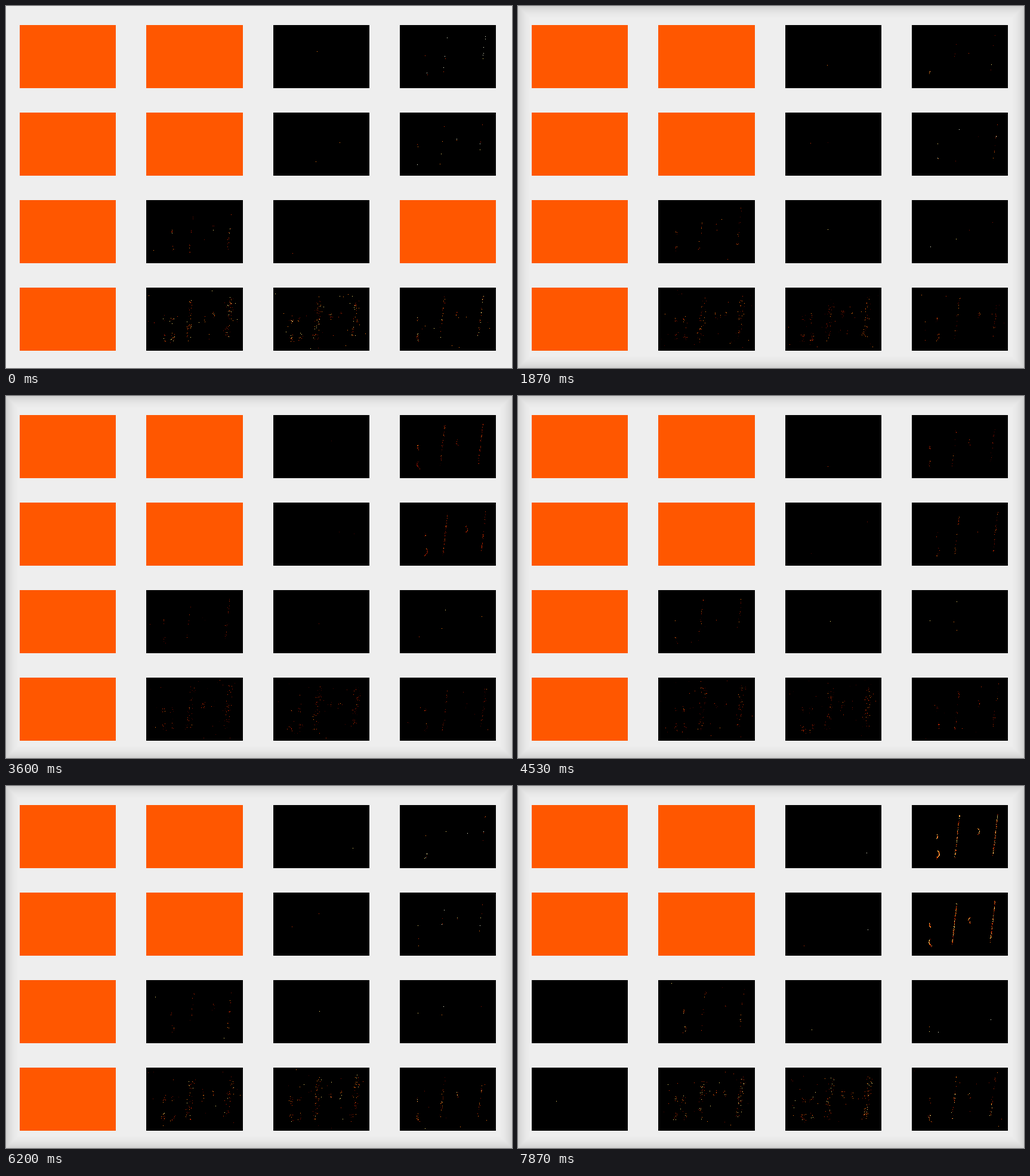
Recreate the animation shown at these times as an HTML page with a canvas. Size 848 px wide and 608 px high, loop 8 s.

```html
<!DOCTYPE html>
<html lang="en">
<head>
<meta charset="utf-8">
<title>Panel grid</title>
<style>
html, body { margin: 0; width: 100%; height: 100%; overflow: hidden; background: #eee; }
canvas { display: block; }
</style>
</head>
<body>
<canvas id="stage" width="848" height="608"></canvas>
<script>
const ctx = document.getElementById('stage').getContext('2d');
const W = 848, H = 608, LOOP = 8000, TICK = 200 / 3;
const PAPER = '#eee', ORANGE = '#ff5700';
const RAMP = ['#200000', '#480400', '#861000', '#d83000', '#ff7a10', '#ffe070', '#ffffe0'];

// When each new state begins to fade in, and for how many ticks.
const STARTS = [130, 930, 1730, 2600, 3470, 4270, 5070, 5930, 6930, 7730];
const TICKS = [2, 3, 2, 3, 2, 4, 3, 4, 2, 2];

// Outline strokes: start, control and end point, then the share of dots.
const OUTLINE = [
  { path: [[75, 16], [71, 52], [67, 87]], share: .33 },
  { path: [[139, 14], [135, 49], [131, 83]], share: .33 },
  { path: [[98, 40], [92, 45], [98, 51]], share: .08 },
  { path: [[30, 50], [28, 54], [31, 58]], share: .1 },
  { path: [[31, 77], [25, 83], [33, 90]], share: .16 }
];

// Grid cell, outline side (-1 left, 1 right, 0 both), dots, spread and stray dots.
const PANELS = [
  { col: 3, row: 0, side: 1, dots: 14, spread: .5, stray: 0, surge: 26 },
  { col: 3, row: 1, side: -1, dots: 14, spread: .5, stray: 0, surge: 26 },
  { col: 3, row: 2, side: 0, dots: 4, spread: 1, stray: 0 },
  { col: 3, row: 3, side: -1, dots: 70, spread: 1, stray: 8 },
  { col: 2, row: 0, side: 0, dots: 1, spread: 1, stray: 0 },
  { col: 2, row: 1, side: 0, dots: 2, spread: 1, stray: 0 },
  { col: 2, row: 2, side: 0, dots: 1, spread: 1, stray: 0 },
  { col: 2, row: 3, side: 0, dots: 130, spread: 2, stray: 24 },
  { col: 1, row: 2, side: 1, dots: 36, spread: 1, stray: 2 },
  { col: 1, row: 3, side: 0, dots: 120, spread: 2, stray: 22 },
  { col: 0, row: 3, side: 0, dots: 1, spread: 1, stray: 0 }
];

const panelX = col => Math.round(23 + 212.33 * col);
const panelRight = col => Math.round(184.3 + 212.33 * col);
const panelY = row => 32 + 147 * row;
const PANEL_H = 106;

function makeRandom(seed) {
  let a = Math.imul(seed, 2654435761);
  return () => {
    a = a + 0x6d2b79f5 | 0;
    let t = Math.imul(a ^ a >>> 15, 1 | a);
    t = t + Math.imul(t ^ t >>> 7, 61 | t) ^ t;
    return ((t ^ t >>> 14) >>> 0) / 4294967296;
  };
}

// A random point on the outline; the right side is shifted and its hooks are mirrored.
function outlinePoint(side, random) {
  let pick = random();
  const index = Math.max(0, OUTLINE.findIndex(s => (pick -= s.share) < 0));
  const [a, b, c] = OUTLINE[index].path;
  const t = random(), u = 1 - t;
  const at = k => u * u * a[k] + 2 * u * t * b[k] + t * t * c[k];
  if (side < 0) return [at(0), at(1)];
  const isHook = index > 1;
  const x = isHook ? 2 * a[0] - at(0) + 12 : at(0) + 4.5;
  return [x, at(1) + (isHook ? -1 : 1)];
}

function dotCount(panel, state) {
  const wave = Math.max(0, Math.cos(state * Math.PI * 2 / 5));
  return Math.round(panel.dots + (panel.surge || 0) * state * wave);
}

function drawDots(g, panel, state) {
  const random = makeRandom(panel.col * 131 + panel.row * 37 + state * 17 + 5);
  const left = panelX(panel.col), top = panelY(panel.row);
  const flip = Math.floor((state + 2) / 5) % 2 ? -1 : 1;
  const heat = 2.3 + .9 * Math.cos(state * Math.PI / 5);
  const count = dotCount(panel, state);
  const spots = [];
  for (let i = 0; i < count + panel.stray; i++) {
    const side = panel.side * flip || (random() < .5 ? -1 : 1);
    let [x, y] = outlinePoint(side, random);
    x += (random() + random() - 1) * 2 * panel.spread;
    y += (random() + random() - 1) * 2 * panel.spread;
    if (i >= count) {
      x = 3 + random() * 155;
      y = 3 + random() * 100;
    }
    const few = count < 20 ? 1.5 : 0;
    const level = Math.round(heat + few + (random() - .5) * 4.6);
    spots.push({ x, y, level: Math.max(0, Math.min(6, level)) });
  }
  spots.sort((p, q) => p.level - q.level);
  for (const { x, y, level } of spots) {
    g.fillStyle = RAMP[level];
    g.fillRect(Math.round(left + x), Math.round(top + y), 1, 1);
  }
}

// Cells stay orange until they come into use.
function isOrange(col, row, state) {
  if (col < 2 && row < 2) return true;
  if (col === 0) return state < row + 7;
  return col === 3 && row === 2 && state === 0;
}

function drawVignette(g) {
  const depth = 24;
  for (let d = 0; d < depth; d++) {
    g.strokeStyle = `rgba(0,0,0,${.12 * (1 - d / depth) ** 2})`;
    g.strokeRect(d + .5, d + .5, W - 2 * d - 1, H - 2 * d - 1);
  }
}

function renderState(state) {
  const sheet = document.createElement('canvas');
  sheet.width = W;
  sheet.height = H;
  const g = sheet.getContext('2d');
  g.fillStyle = PAPER;
  g.fillRect(0, 0, W, H);
  if (state) drawVignette(g);
  for (let row = 0; row < 4; row++) {
    for (let col = 0; col < 4; col++) {
      const x = panelX(col);
      g.fillStyle = isOrange(col, row, state) ? ORANGE : '#000';
      g.fillRect(x, panelY(row), panelRight(col) - x, PANEL_H);
    }
  }
  PANELS.filter(p => !isOrange(p.col, p.row, state)).forEach(p => drawDots(g, p, state));
  return sheet;
}

const sheets = Array.from({ length: STARTS.length + 1 }, (_, i) => renderState(i));

function draw(time) {
  const state = STARTS.filter(start => time >= start).length;
  ctx.globalAlpha = 1;
  ctx.drawImage(sheets[Math.max(0, state - 1)], 0, 0);
  if (!state) return;
  const step = Math.floor((time - STARTS[state - 1]) / TICK + .1) + 1;
  ctx.globalAlpha = Math.min(1, step / (TICKS[state - 1] + 1));
  ctx.drawImage(sheets[state], 0, 0);
}

const began = performance.now();
function tick() {
  draw((performance.now() - began) % LOOP);
  requestAnimationFrame(tick);
}
tick();
</script>
</body>
</html>
```
